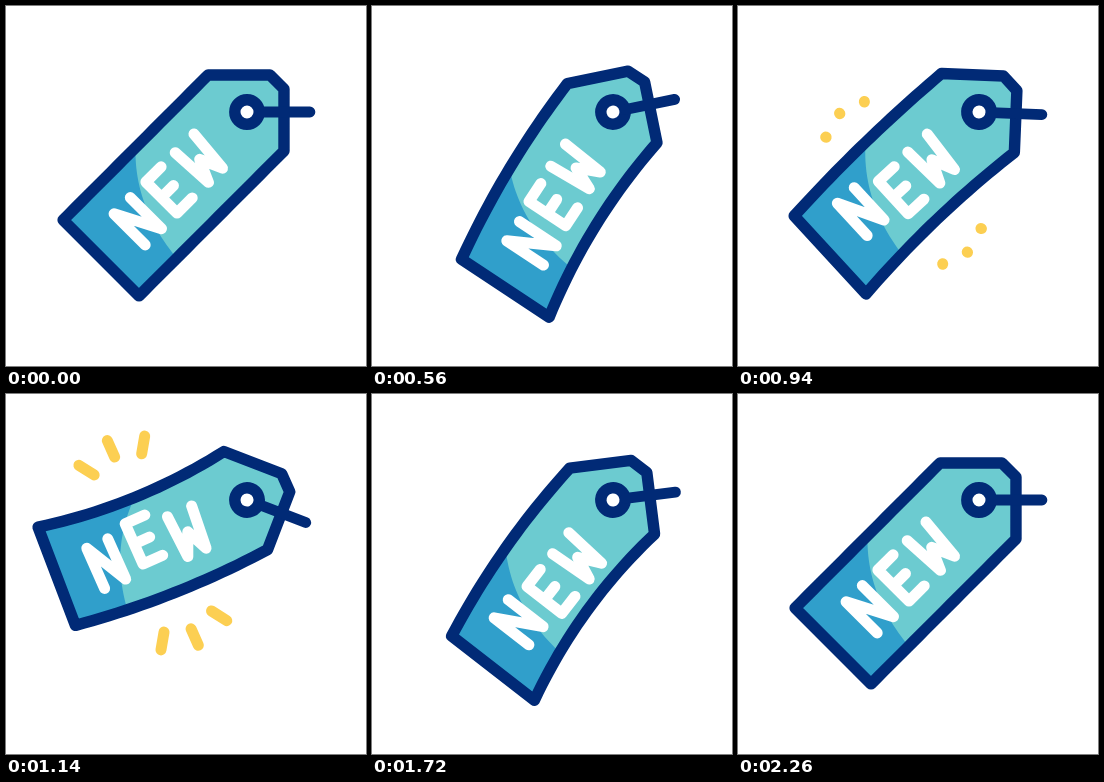
An HTML page for the animation above (2.4 s loop, 360 px wide and 360 px high).

```html
<!DOCTYPE html>
<html lang="en">
<head>
<meta charset="utf-8">
<title>New tag</title>
<style>
  html, body { margin: 0; width: 100%; height: 100%; overflow: hidden; background: #fff; }
  svg { display: block; width: 100vw; height: 100vh; }
  path, circle { fill: none; stroke-linecap: round; stroke-linejoin: round; }
  .navy { stroke: #012a76; stroke-width: 11.4; }
  #body { fill: #6ccbd0; }
  #shade { fill: #309fcb; }
  #ring { fill: #fff; }
  #string { stroke-width: 10.8; }
  .letter { stroke: #fff; stroke-width: 11; }
  #sparks { stroke: #fccf52; stroke-width: 11; }
</style>
</head>
<body>
<svg viewBox="0 0 360 360" role="img" aria-label="NEW">
  <!-- local axes: x runs from the ring to the tag's end, y across the tag -->
  <g id="tag">
    <path id="sparks"/>
    <path id="body"/>
    <path id="shade"/>
    <path class="letter" d="M166 22V-22L143 22V-22"/>
    <path class="letter" d="M99.5-22H121V22H99.5M121 0H104"/>
    <path class="letter" d="M79.5-22L77 22.5L67 0L57 22.5L53-22"/>
    <path id="outline" class="navy"/>
    <circle id="ring" class="navy" r="12.2"/>
    <path id="string" class="navy" d="M-9 9L-44.5 44.5"/>
  </g>
</svg>
<script>
const LOOP = 2400, HALF = 53.7, NECK = 1.4, LENGTH = 205, END = NECK + LENGTH;
const LETTER_DELAY = 240;
const $ = id => document.getElementById(id);
const letters = document.querySelectorAll(".letter");

// Keys are [time, value] pairs, eased in and out.
const swing = [[200, 0], [705, -14.2], [1210, 22.7], [1580, -8], [2260, 0]];
const bend = [[240, 0], [745, 10.4], [1305, -12], [1650, 8.6], [2260, 0]];
const hop = [[140, 0], [680, 5], [960, -7], [1330, 9.5], [1780, 0]];
const sparkTip = [[920, 0], [1120, 1]];
const sparkRoot = [[1240, 0], [1480, 1]];

const mix = (a, b, k) => a + (b - a) * k;
const ease = k => (1 - Math.cos(Math.PI * k)) / 2;

function at(keys, t) {
  const i = keys.findIndex(key => t < key[0]);
  if (i === 0) return keys[0][1];
  if (i < 0) return keys[keys.length - 1][1];
  const [t0, a] = keys[i - 1], [t1, b] = keys[i];
  return mix(a, b, ease((t - t0) / (t1 - t0)));
}

const line = pts => "M" + pts.map(p => p.map(n => n.toFixed(2)).join(" ")).join("L");
const sample = (fn, n = 24) => Array.from({ length: n + 1 }, (_, i) => fn(i / n));
const edge = (from, to, y) => sample(k => [mix(from, to, k), y]);
const quad = (a, b, c, k) => mix(mix(a, b, k), mix(b, c, k), k);

const tagShape = [
  [-42.4, -9.9], ...edge(NECK, END, -HALF), ...edge(END, NECK, HALF), [-42.4, 9.9]
];
const border = sample(k => [quad(104, 147, 153, k), quad(-HALF, -12.7, HALF, k)]);
const shadeShape = [...border, ...edge(153, END, HALF), ...edge(END, 104, -HALF)];

// Sag the middle against the end's shift, more strongly on the inner side.
function warp(e) {
  return ([x, y]) => {
    const k = Math.max(0, (x - NECK) / LENGTH), side = y / HALF;
    const sag = 3.9 * k * (1 - k) * (1 + 0.2 * side * Math.sign(e));
    const pull = Math.min(e, 0) * (0.21 - 0.38 * side) * k;
    const width = 1 - 0.003 * Math.abs(e) * k;
    return [x + pull, y * width + e * (k - sag)];
  };
}

function sparkPath(t) {
  const tip = at(sparkTip, t), root = at(sparkRoot, t);
  if (tip <= 0 || root >= 1) return "";
  const spark = (side, i) => line([root, tip].map(k => [
    103.5 + i * mix(26, 36, k),
    1 + side * (mix(94, 112, k) - Math.abs(i) * mix(8, 11, k))
  ]));
  return [-1, 1].map(side => [-1, 0, 1].map(i => spark(side, i)).join("")).join("");
}

function draw(t) {
  const curve = warp(at(bend, t));
  const outline = line(tagShape.map(curve)) + "Z";

  $("tag").setAttribute("transform",
    `translate(241 106) rotate(${at(swing, t) + 135}) scale(1 -1)`);
  $("body").setAttribute("d", outline);
  $("outline").setAttribute("d", outline);
  $("shade").setAttribute("d", line(shadeShape.map(curve)) + "Z");
  $("sparks").setAttribute("d", sparkPath(t));
  letters.forEach((letter, i) =>
    letter.setAttribute("transform", `translate(0 ${at(hop, t - i * LETTER_DELAY)})`));
}

const start = performance.now();
function tick() {
  draw((performance.now() - start) % LOOP);
  requestAnimationFrame(tick);
}
tick();
</script>
</body>
</html>
```
